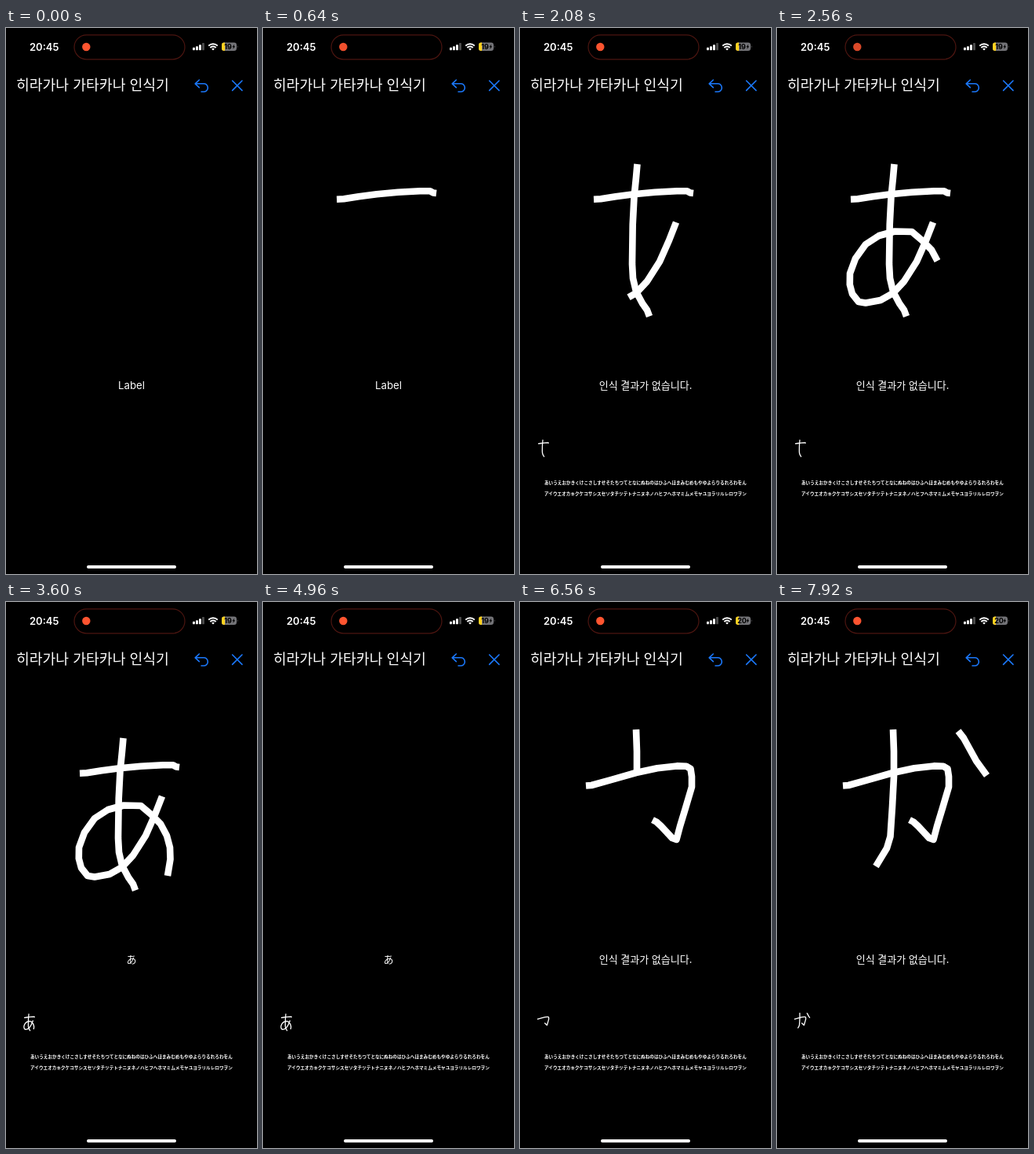
An HTML page for the animation above (8000 ms loop, 320x694 px).

```html
<!DOCTYPE html>
<html lang="ko">
<head>
<meta charset="utf-8">
<title>히라가나 가타카나 인식기</title>
<style>
  html, body { margin: 0; width: 100%; height: 100%; overflow: hidden; background: #000; }
  svg { display: block; width: 100vw; height: 100vh; }
  text { fill: #fff; font-family: Inter, "Noto Sans CJK KR", sans-serif; }
  .ko { font-family: "Noto Sans CJK KR", sans-serif; }
  .ja { font-family: "Noto Sans CJK JP", sans-serif; }
  .mid { text-anchor: middle; }
  .icon { fill: none; stroke: #1b78fb; stroke-width: 1.6; stroke-linecap: round; stroke-linejoin: round; }
  .ink { fill: none; stroke: #fff; stroke-width: 8.6; stroke-linejoin: round; }
  #thumb .ink { stroke-width: 12; }
</style>
</head>
<body>
<svg viewBox="0 0 320 694" preserveAspectRatio="xMidYMid meet">
  <rect width="320" height="694" fill="#000"/>

  <text x="30" y="28.6" font-size="13" font-weight="600">20:45</text>
  <rect x="87" y="8.8" width="141" height="31" rx="15.5" fill="none" stroke="#4c1510" stroke-width="1.2"/>
  <circle id="dot" cx="102.3" cy="24" r="5.2" fill="#ff5530"/>

  <g fill="#fff">
    <rect x="238" y="24.8" width="2.9" height="3.4" rx=".7"/>
    <rect x="242" y="23.2" width="2.9" height="5" rx=".7"/>
    <rect x="246" y="21.2" width="2.9" height="7" rx=".7"/>
    <rect x="250" y="19" width="2.9" height="9.2" rx=".7" opacity=".3"/>
  </g>
  <g fill="none" stroke="#fff" stroke-width="1.9">
    <path d="M258.2 22.7A8.2 8.2 0 0 1 269.8 22.7"/>
    <path d="M260.3 25A5.2 5.2 0 0 1 267.7 25"/>
    <path d="M264 28.5L262.1 26.6A2.7 2.7 0 0 1 265.9 26.6Z" fill="#fff" stroke="none"/>
  </g>
  <clipPath id="cell"><rect x="275" y="18.5" width="19" height="10.4" rx="3.2"/></clipPath>
  <g clip-path="url(#cell)">
    <rect x="275" y="18" width="19" height="12" fill="#747478"/>
    <rect x="275" y="18" width="4" height="12" fill="#ffd21f"/>
  </g>
  <path d="M294.8 22Q296.4 23.7 294.8 25.4Z" fill="#747478"/>
  <text id="charge" class="mid" x="283" y="27" font-size="9" font-weight="700" style="fill:#000">19</text>
  <path d="M291.3 20.6L288.4 24.2H290L289.3 27L292.2 23.3H290.6Z" fill="#000"/>

  <text class="ko" x="13" y="79.2" font-size="18.25">히라가나 가타카나 인식기</text>
  <path class="icon" d="M246.3 66L241.2 70.8L246.3 75.6M241.6 70.8H252.2A5.1 5.1 0 0 1 252.2 81H249"/>
  <path id="clear" class="icon" d="M288.6 67L301 79.4M301 67L288.6 79.4"/>

  <g id="canvas"></g>
  <text id="result" class="mid" x="160" y="459"></text>
  <g id="thumb" transform="matrix(.109 0 0 .113 12.8 503.8)"></g>
  <g id="kana" font-size="5.61" font-weight="700">
    <text class="ja" x="31" y="580.2">あいうえおかきくけこさしすせそたちつてとなにぬねのはひふへほまみむめもやゆよらりるれろわをん</text>
    <text class="ja" x="31" y="593.6">アイウエオカキクケコサシスセソタチツテトナニヌネノハヒフヘホマミムメモヤユヨラリルレロワヲン</text>
  </g>
  <rect x="103" y="683" width="114" height="4" rx="2" fill="#fff"/>
</svg>
<script>
const LOOP = 8000, STEP = 80;
const CLEAR = 4560, RECOGNISED = 2880, SECOND_CHAR = 5960;

// start and end of drawing, then the moment the stroke is committed
const strokes = [
  { char: 0, start: 240, end: 640, commit: 800,
    d: "M94 217.7L103 217.3L122 214.2L145 211.3L172 208.8L200 207.2L213 207.3L217 209.5L221 210" },
  { char: 0, start: 1080, end: 1510, commit: 1680,
    d: "M149.5 173L148 190L145.5 215L143.7 250L143 300L144 318L148 335L156 350L162 358.5L165 366.5" },
  { char: 0, start: 1840, end: 2670, commit: RECOGNISED,
    d: "M199 247L190 270L178 297L162 322L148 337L132 346L113 349.5L104 348L96 338L92.8 326L93 312L100 293" +
       "L113 275L130 264L150 258.5L172 259L185 270L197 282L205 297L209 312L209.5 327L206 348" },
  { char: 1, start: 5200, end: 5800, commit: SECOND_CHAR,
    d: "M84 233.5L91 233L115 226.3L148 217L175 211.3L200 208.4L212 208.8L217.5 212L219 222L219 235" +
       "L211 262L204 285L199.5 302L194 300L180 285L174 279.5L169 277" },
  { char: 1, start: 6440, end: 6840, commit: 7000,
    d: "M148 162L149 190L149 222L147 260L144.5 298L140 313L126 336" },
  { char: 1, start: 7280, end: 7600, commit: 7760,
    d: "M231 164L238 173L254 202L267.5 220.5" }
];

const $ = id => document.getElementById(id);
const clamp = v => Math.min(1, Math.max(0, v));
const show = (el, on) => el.setAttribute("visibility", on ? "visible" : "hidden");

function addPath(parent, d) {
  const path = document.createElementNS("http://www.w3.org/2000/svg", "path");
  path.setAttribute("class", "ink");
  path.setAttribute("d", d);
  path.setAttribute("pathLength", 1);
  return parent.appendChild(path);
}

for (const s of strokes) {
  s.big = addPath($("canvas"), s.d);
  s.small = addPath($("thumb"), s.d);
}

function setResult(text, cls, size) {
  const el = $("result");
  if (el.textContent === text) return;
  el.textContent = text;
  el.setAttribute("class", "mid " + cls);
  el.setAttribute("font-size", size);
}

function draw(t) {
  const thumbChar = t < SECOND_CHAR ? 0 : 1;
  for (const s of strokes) {
    const p = clamp((t - s.start) / (s.end - s.start));
    show(s.big, p > 0 && (s.char === 1 || t < CLEAR));
    s.big.setAttribute("stroke-dasharray", p < 1 ? p + " 2" : "none");
    show(s.small, s.char === thumbChar && t >= s.commit);
  }

  const started = t >= strokes[0].commit;
  show($("kana"), started);
  if (!started) setResult("Label", "", 13.2);
  else if (t >= RECOGNISED && t < SECOND_CHAR) setResult("あ", "ja", 13);
  else setResult("인식 결과가 없습니다.", "ko", 13);

  $("charge").textContent = t < 6320 ? "19" : "20";
  $("clear").setAttribute("opacity", t < 4480 ? 1 : 0.35 + 0.65 * clamp((t - 4560) / 240));
  const pulse = (1 + Math.cos((t - 2560) / 1600 * 2 * Math.PI)) / 2;
  $("dot").setAttribute("opacity", 1 - 0.14 * pulse * pulse);
}

const origin = performance.now();
function frame() {
  const t = (performance.now() - origin) % LOOP;
  draw(Math.floor(t / STEP) * STEP);
  requestAnimationFrame(frame);
}
draw(0);
requestAnimationFrame(frame);
</script>
</body>
</html>
```
